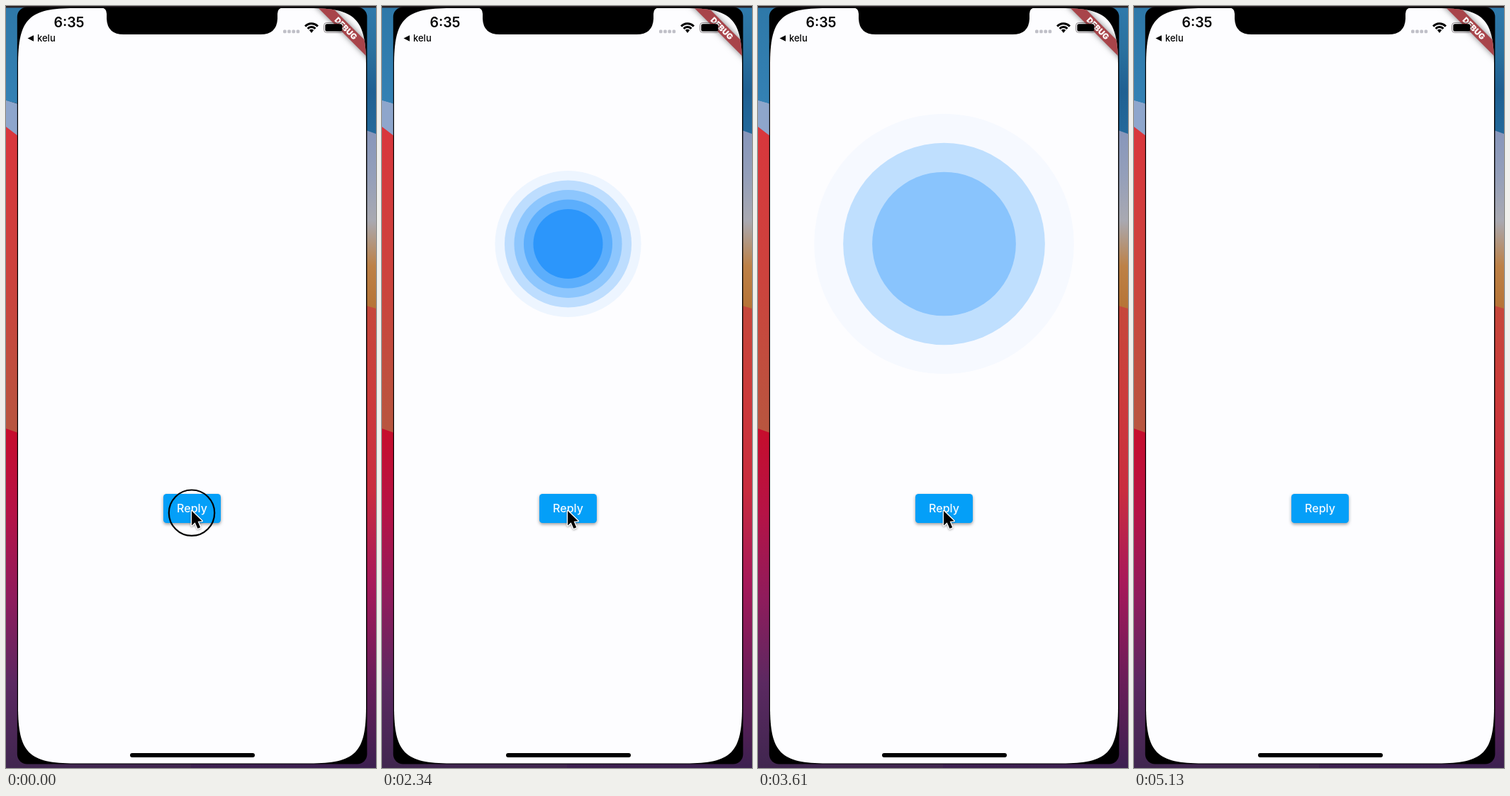
Animation, 522 px wide and 1073 px high, one loop 5150 ms. Source, as an HTML page with a canvas:

```html
<!DOCTYPE html>
<html lang="en">
<head>
<meta charset="utf-8">
<title>Reply ripple</title>
<style>
  html, body { margin: 0; width: 100%; height: 100%; overflow: hidden; background: #000; }
  canvas { display: block; width: 522px; height: 1073px; }
</style>
</head>
<body>
<canvas id="stage"></canvas>
<script>
const W = 522, H = 1073, LOOP = 5150;
const FONT = 'Inter, Roboto, sans-serif';
const BG = [253, 253, 255], BLUE = [32, 144, 251];
const RINGS = 5;

const canvas = document.getElementById('stage');
const dpr = window.devicePixelRatio || 1;
canvas.width = W * dpr;
canvas.height = H * dpr;
const screenCtx = canvas.getContext('2d');

// Ripple keys: time, inner radius, ring gap, inner opacity, opacity step
const RIPPLE = [
  [100, 0, 0, 1.74, .25],
  [1500, 30.7, 6.1, 1.24, .25],
  [2340, 49, 13.5, .945, .218],
  [3170, 85.6, 31.7, .655, .241],
  [4040, 118.3, 50, .395, .25],
  [4540, 151.5, 61, .175, .25],
  [5080, 186, 73, 0, .25]
];
// Pointer keys: time, x, y of the tip
const POINTER = [
  [4440, 262, 711],
  [4540, 270, 697],
  [4680, 350, 640],
  [4860, 530, 560]
];

function sample(keys, t) {
  const last = keys.length - 1;
  if (t <= keys[0][0]) return keys[0].slice(1);
  if (t >= keys[last][0]) return keys[last].slice(1);
  let i = 0;
  while (t >= keys[i + 1][0]) i++;
  const a = keys[i], b = keys[i + 1];
  const span = b[0] - a[0], u = (t - a[0]) / span;
  const slope = (k, c) => {
    const p = keys[Math.max(k - 1, 0)], n = keys[Math.min(k + 1, last)];
    return (n[c] - p[c]) / (n[0] - p[0]) * span;
  };
  return a.slice(1).map((v, j) => {
    const c = j + 1, d = b[c] - v, m = slope(i, c), n = slope(i + 1, c);
    return v + m * u + (3 * d - 2 * m - n) * u * u + (m + n - 2 * d) * u * u * u;
  });
}

function mix(a) {
  return 'rgb(' + BG.map((v, i) => Math.round(v + (BLUE[i] - v) * a)).join(',') + ')';
}

function poly(g, color, ...pts) {
  g.fillStyle = color;
  g.beginPath();
  for (let i = 0; i < pts.length; i += 2) g.lineTo(pts[i], pts[i + 1]);
  g.closePath();
  g.fill();
}

function pill(g, color, x, y, w, h, r) {
  g.fillStyle = color;
  g.beginPath();
  g.roundRect(x, y, w, h, r);
  g.fill();
}

function text(g, str, x, y, font, color, align = 'center') {
  g.font = font + ' ' + FONT;
  g.fillStyle = color;
  g.textAlign = align;
  g.fillText(str, x, y);
}

function fade(g, y0, y1, ...colors) {
  const grad = g.createLinearGradient(0, y0, 0, y1);
  colors.forEach((c, i) => grad.addColorStop(i / (colors.length - 1), c));
  return grad;
}

function wallpaper(g) {
  const m = 261;
  poly(g, fade(g, 0, 135, '#2e78a8', '#3481b4'), 0, 0, m, 0, m, 200, 0, 133);
  poly(g, '#8ea6cc', 0, 133, 17, 138, 17, 200, 0, 200);
  poly(g, fade(g, 170, 600, '#d9363c', '#cc433d', '#b8563f'), 0, 170, 17, 183, 17, 610, 0, 610);
  poly(g, fade(g, 595, H, '#c70d2c', '#b51346', '#8f1c5c', '#5b2961', '#40264f'),
    0, 595, 17, 601, m, 700, m, H, 0, H);
  poly(g, fade(g, 0, 180, '#2f7aac', '#2a719f', '#1f6092', '#23699b'), m, 0, W, 0, W, 182, m, 182);
  poly(g, fade(g, 175, 430, '#8796bb', '#949fba', '#a9a9b1', '#bd8147', '#b67335'),
    m, 100, 508, 175, W, 180, W, 430, m, 430);
  poly(g, fade(g, 422, H, '#c6483c', '#cc3b3b', '#c92d3f', '#a7195a', '#6c1d59', '#3c2050'),
    m, 350, 508, 422, W, 426, W, H, m, H);
  pill(g, '#2b2326', 0, 0, W, 2.5, 0);
}

function screenPath(g) {
  const l = 17, r = 508, t = 3, b = 1066.5, e = 80, k = 15;
  g.beginPath();
  g.moveTo(l, t + e);
  g.bezierCurveTo(l, t + k, l + k, t, l + e, t);
  g.lineTo(r - e, t);
  g.bezierCurveTo(r - k, t, r, t + k, r, t + e);
  g.lineTo(r, b - e);
  g.bezierCurveTo(r, b - k, r - k, b, r - e, b);
  g.lineTo(l + e, b);
  g.bezierCurveTo(l + k, b, l, b - k, l, b - e);
  g.closePath();
}

function notch(g) {
  const l = 142, r = 383, b = 40, c = 22;
  g.fillStyle = '#000';
  g.beginPath();
  g.moveTo(l - 8, 2);
  g.quadraticCurveTo(l, 3, l, 11);
  g.lineTo(l, b - c);
  g.quadraticCurveTo(l + 1, b, l + c + 2, b);
  g.lineTo(r - c - 2, b);
  g.quadraticCurveTo(r - 1, b, r, b - c);
  g.lineTo(r, 11);
  g.quadraticCurveTo(r, 3, r + 8, 2);
  g.fill();
}

function banner(g) {
  g.save();
  g.translate(508, 3);
  g.rotate(Math.PI / 4);
  g.save();
  g.shadowColor = 'rgba(0,0,0,.5)';
  g.shadowBlur = 8 * dpr;
  g.fillStyle = '#a8444a';
  g.fillRect(-60, 33.2, 120, 14.3);
  g.restore();
  text(g, 'DEBUG', 0, 44.5, '900 11.3px', '#fff');
  g.restore();
}

function wifi(g) {
  g.strokeStyle = '#000';
  g.lineWidth = 3;
  for (const r of [12.2, 7.4]) {
    g.beginPath();
    g.arc(431, 37, r, -Math.PI * .76, -Math.PI * .24);
    g.stroke();
  }
  g.fillStyle = '#000';
  g.beginPath();
  g.moveTo(431, 38);
  g.arc(431, 37, 4.3, -Math.PI * .76, -Math.PI * .24);
  g.fill();
}

function statusBar(g) {
  text(g, '6:35', 89, 30, '600 19.5px', '#000');
  poly(g, '#000', 30.5, 45.5, 39, 41.3, 39, 49.7);
  text(g, 'kelu', 44, 50, '500 13px', '#000', 'left');
  for (let i = 0; i < 4; i++) pill(g, '#c0c0c8', 391 + i * 6.2, 33.6, 4.6, 4.6, 1.5);
  wifi(g);
  g.strokeStyle = 'rgba(70,60,65,.6)';
  g.lineWidth = 1;
  g.beginPath();
  g.roundRect(448.5, 23.5, 27.5, 14, 4);
  g.stroke();
  pill(g, '#000', 450.3, 25.3, 24, 10.4, 2.5);
}

function button(g) {
  g.save();
  g.shadowColor = 'rgba(0,0,0,.38)';
  g.shadowBlur = 4 * dpr;
  g.shadowOffsetY = 2 * dpr;
  pill(g, '#049ff8', 222, 687, 81, 41, 4.5);
  g.restore();
  text(g, 'Reply', 262.5, 713, '500 16px', '#f4faff');
}

function pointer(g, x, y) {
  g.save();
  g.translate(x, y);
  g.beginPath();
  const pts = [0, 0, 0, 20.5, 4.7, 16.2, 8.4, 24.8, 12.2, 23.2, 8.6, 14.8, 14.6, 14.3];
  for (let i = 0; i < pts.length; i += 2) g.lineTo(pts[i], pts[i + 1]);
  g.closePath();
  g.shadowColor = 'rgba(0,0,0,.35)';
  g.shadowBlur = 3 * dpr;
  g.shadowOffsetY = dpr;
  g.strokeStyle = '#fff';
  g.lineWidth = 2.6;
  g.lineJoin = 'round';
  g.stroke();
  g.shadowColor = 'transparent';
  g.fillStyle = '#000';
  g.fill();
  g.restore();
}

function ripple(g, t) {
  const [inner, gap, alpha, step] = sample(RIPPLE, t);
  for (let i = RINGS - 1; i >= 0; i--) {
    const a = Math.min(1, alpha - step * i);
    if (a <= 0) continue;
    g.fillStyle = mix(a);
    g.beginPath();
    g.arc(262.5, 335, Math.max(0, inner + gap * i), 0, Math.PI * 2);
    g.fill();
  }
}

// Everything that never moves is painted once
const still = document.createElement('canvas');
still.width = canvas.width;
still.height = canvas.height;

function paintStill() {
  const g = still.getContext('2d');
  g.scale(dpr, dpr);
  wallpaper(g);
  pill(g, '#000', 15.8, 1.5, 493.6, 1066, 14);
  g.save();
  screenPath(g);
  g.fillStyle = mix(0);
  g.fill();
  g.clip();
  banner(g);
  g.restore();
  notch(g);
  statusBar(g);
  button(g);
  pill(g, '#000', 175, 1052, 176, 6, 3);
}

function draw(t) {
  const g = screenCtx;
  g.setTransform(dpr, 0, 0, dpr, 0, 0);
  g.drawImage(still, 0, 0, W, H);
  ripple(g, t);
  if (t < 100) {
    g.strokeStyle = '#000';
    g.lineWidth = 2.2;
    g.beginPath();
    g.arc(262, 713.7, 32.2, 0, Math.PI * 2);
    g.stroke();
  }
  if (t < 4860) pointer(g, ...sample(POINTER, t));
}

paintStill();
const start = performance.now();
function tick() {
  draw((performance.now() - start) % LOOP);
  requestAnimationFrame(tick);
}
tick();
</script>
</body>
</html>
```
